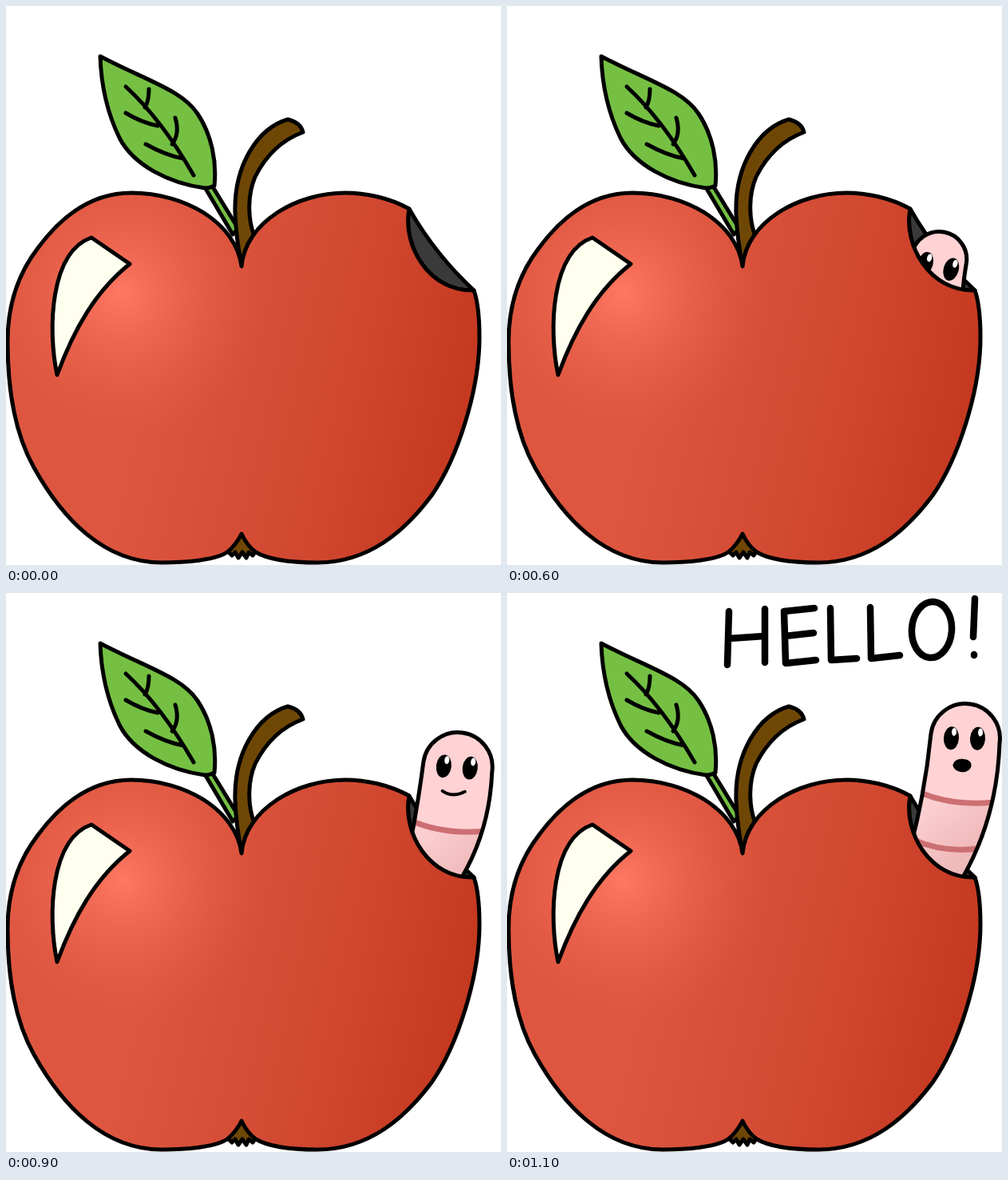
Write an HTML page that moves like this. It is 620 by 700 pixels and loops after 1.9 s.

```html
<!DOCTYPE html>
<html lang="en">
<head>
<meta charset="utf-8">
<title>Hello apple</title>
<style>
html, body { margin: 0; width: 100%; height: 100%; overflow: hidden; background: #fff; }
svg { display: block; width: 100%; height: 100%; }
.ink { stroke: #000; stroke-width: 5; stroke-linejoin: round; stroke-linecap: round; }
.line { fill: none; }
</style>
</head>
<body>
<svg viewBox="0 0 620 700" xmlns="http://www.w3.org/2000/svg">
  <defs>
    <linearGradient id="skin" gradientUnits="userSpaceOnUse" x1="190" y1="400" x2="590" y2="490">
      <stop offset="0" stop-color="#de5640"/>
      <stop offset=".5" stop-color="#d34a33"/>
      <stop offset="1" stop-color="#c53820"/>
    </linearGradient>
    <radialGradient id="glow" gradientUnits="userSpaceOnUse" cx="145" cy="360" r="185">
      <stop offset="0" stop-color="#ff7863"/>
      <stop offset="1" stop-color="#e25a44" stop-opacity="0"/>
    </radialGradient>
    <linearGradient id="shade" gradientUnits="userSpaceOnUse" x1="-40" y1="75" x2="10" y2="135">
      <stop offset="0" stop-color="#fcd0d1"/>
      <stop offset="1" stop-color="#f0b9ba"/>
    </linearGradient>
    <path id="apple" d="M295 326C288 272 225 234 157 234C105 234 68 265 40 303C10 342 2 385 2 420C2 470 8 530 35 578C70 641 122 697 195 697C225 697 262 694 277 684Q288 675 295 661Q302 676 313 684C330 694 360 697 390 697C455 697 500 657 533 613C566 566 593 480 593 415C593 390 591 370 586 356C530 358 496 300 505 254C480 240 450 234 425 234C365 234 300 270 295 326Z"/>
    <clipPath id="above"><path d="M586 356C530 358 496 300 505 254L400 254V0H640V356Z"/></clipPath>
    <clipPath id="inside"><path id="bodyClip"/></clipPath>
  </defs>

  <g class="ink">
    <path fill="#75c043" d="M249 227L284 286L291 279L258 225Z"/>
    <path fill="#75c043" d="M118 63C175 93 220 105 240 135C258 162 264 195 261 225Q256 228 249 228C205 222 160 200 142 165C125 130 119 95 118 63Z"/>
    <path class="line" d="M150 101C185 133 212 172 235 212M179 104Q179 119 174 127M150 134Q170 146 190 150M212 140Q218 160 208 173M175 173Q200 187 222 191"/>
    <path fill="#6f4705" d="M353 142C315 153 285 200 287 260Q288 290 295 324L311 288C302 265 303 235 312 214C325 188 345 168 372 158Q369 146 353 142Z"/>
    <path fill="#6f4705" d="M295 661L277 682L283 688L287 684L291 691L296 684L301 691L304 684L309 688L313 682Z"/>
  </g>

  <path class="ink" fill="#3a3a3a" d="M505 254C530 298 560 332 586 356C530 358 496 300 505 254Z"/>
  <g id="worm" clip-path="url(#above)">
    <path id="body" fill="#ffd2d3"/>
    <g clip-path="url(#inside)">
      <g id="bands">
        <path fill="url(#shade)" d="M-60 66Q-14 87 45 79V200H-100V66Z"/>
        <path fill="none" stroke="#cc6f72" stroke-width="7" d="M-60 66Q-14 87 45 79M-64 127Q-24 145 24 137"/>
      </g>
    </g>
    <path id="edge" class="ink line"/>
    <g id="face">
      <g id="eyes"></g>
      <path id="smile" class="ink line" style="stroke-width:4" d="M-16 31Q-3 39 12 30"/>
      <path id="gasp" d="M-14 34C-13 28 -7 25 -1 26C6 26 10 30 9 35C7 41 1 43 -4 42C-10 41 -13 38 -14 34Z"/>
    </g>
  </g>

  <use href="#apple" fill="url(#skin)"/>
  <use href="#apple" fill="url(#glow)"/>
  <use href="#apple" class="ink line"/>
  <path class="ink" fill="#fffff0" d="M107 290L155 323C112 357 85 405 64 462C52 405 55 308 107 290Z"/>

  <g id="hello" role="img" aria-label="HELLO!" fill="none" stroke="#000" stroke-width="8.5" stroke-linecap="round" stroke-linejoin="round">
    <path d="M278 23L276 90M323 20L323 87M278 57L322 54"/>
    <path d="M385 19L347 23L349 88L387 84M348 54L384 50"/>
    <path d="M405 19L406 84L438 82M455 18L456 82L492 78"/>
    <ellipse cx="532" cy="46" rx="25" ry="35" transform="rotate(4 532 46)"/>
    <path d="M586 7L584 55M585 77V78"/>
  </g>
</svg>
<script>
const LOOP = 1900, RISE = 500, STEP = 100, LAST = 5, TALK = 1100;
const $ = id => document.getElementById(id);

$('eyes').innerHTML = [-16.5, 16.5].map(x =>
  `<g transform="translate(${x} 0) rotate(3)"><ellipse rx="9.5" ry="14.5"/>` +
  `<ellipse cx="3" cy="-8" rx="3" ry="5" fill="#fff"/></g>`).join('');

function show(id, on) {
  $(id).style.display = on ? '' : 'none';
}

// The head climbs up and to the right by the same amount each step.
function poseWorm(n) {
  const x = 533 + 8.2 * n;
  const top = 319 - 36 * n;
  const r = Math.min(43, 26 + 8 * n);
  const left = x - r, right = x + r;
  const yl = top + r - 6, yr = top + r + 6;
  const outline = `505 320Q${left - 7} ${(yl + 320) / 2} ${left} ${yl}` +
    `A${r} ${r} 0 0 1 ${right} ${yr}` +
    `Q${right - 3} ${yr + 0.55 * (356 - yr)} 571 356`;

  for (const id of ['body', 'bodyClip']) $(id).setAttribute('d', `M500 362L${outline}V362Z`);
  $('edge').setAttribute('d', 'M' + outline);
  const place = `translate(${x - 1} ${top + 43})`;
  $('bands').setAttribute('transform', place);
  $('face').setAttribute('transform', `${place} rotate(${16 - 3 * n})`);
}

function draw(t) {
  const n = Math.min(LAST, Math.floor((t - RISE) / STEP));
  const talking = t >= TALK;
  show('worm', n >= 0);
  show('hello', talking);
  show('smile', !talking);
  show('gasp', talking);
  if (n >= 0) poseWorm(n);
}

function tick(now) {
  draw(now % LOOP);
  requestAnimationFrame(tick);
}
draw(0);
requestAnimationFrame(tick);
</script>
</body>
</html>
```
